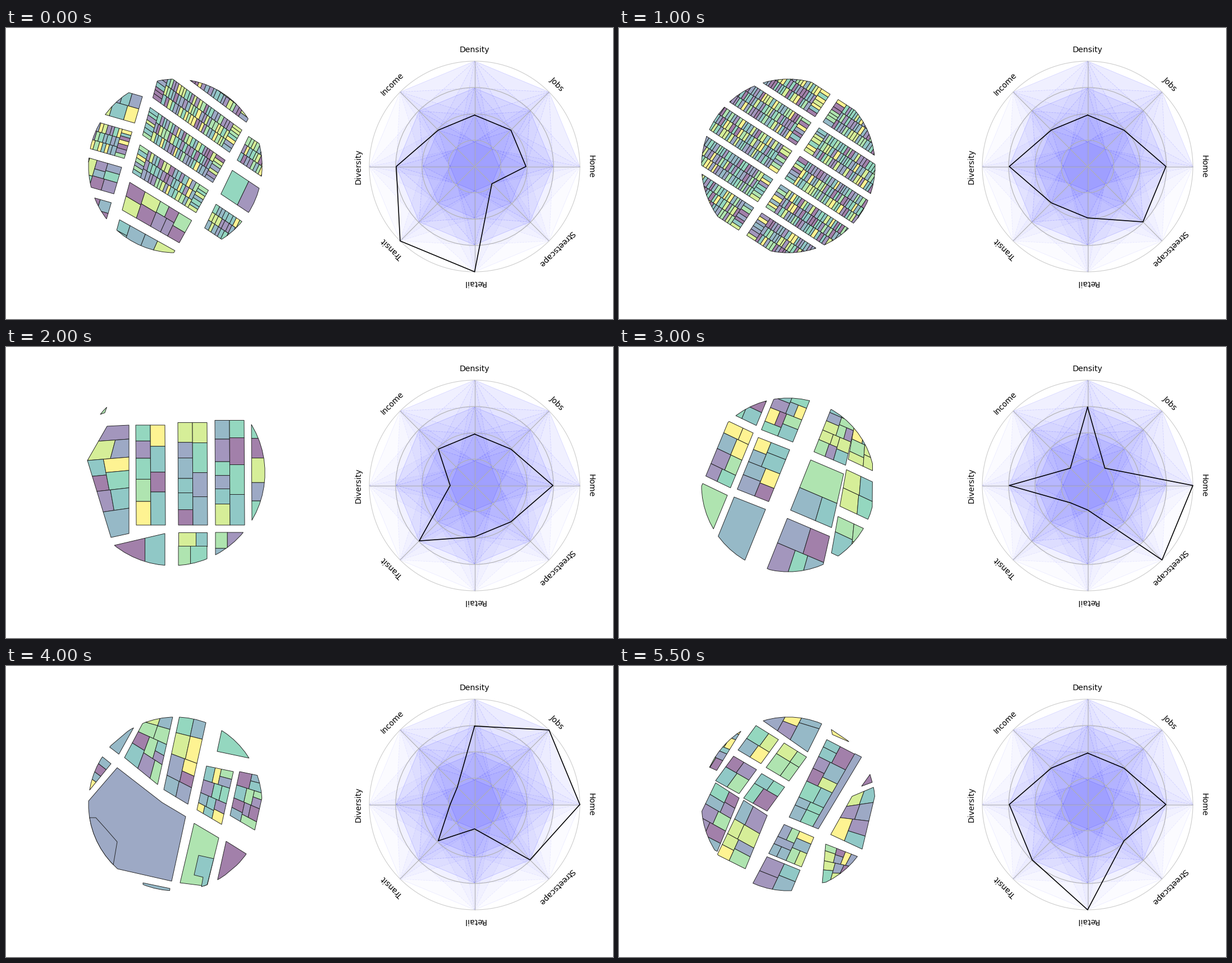
Animation of 1081 by 518 pixels, one loop 6000 ms. Source, as a matplotlib script:

```python
import random
from itertools import product

import numpy as np
import matplotlib.pyplot as plt
from matplotlib.animation import FuncAnimation
from matplotlib.collections import PolyCollection

W, H, DPI = 1081, 518, 100
PX = 72 / DPI
# Viridis at half strength on white.
SHADES = (plt.get_cmap("viridis")(np.linspace(0, 1, 9))[:, :3] + 1) / 2
NORMALS = [np.array((np.cos(a), np.sin(a))) for a in np.arange(64) * np.pi / 32]


def cut(quad, u0, u1, v0, v1):
    """Part of a quad (corners clockwise from top left) in its own u, v space."""
    a, b, c, d = quad

    def at(u, v):
        return (1 - v) * ((1 - u) * a + u * b) + v * ((1 - u) * d + u * c)

    return np.array((at(u0, v0), at(u1, v0), at(u1, v1), at(u0, v1)))


def spans(quad):
    a, b, c, d = quad
    return np.hypot(*(b + c - a - d)) / 2, np.hypot(*(c + d - a - b)) / 2


class Plan:
    """Collects coloured parcels, each cut to a round window."""

    def __init__(self, seed, centre=(301.5, 245.5), radius=154.5):
        self.rng = random.Random(seed)
        self.centre, self.radius = np.array(centre), radius
        self.shapes, self.shades = [], []

    def clip(self, poly):
        for n in NORMALS:
            d = (poly - self.centre) @ n - self.radius
            if d.max() <= 0:
                continue
            out = []
            for i in range(len(poly)):
                if (d[i - 1] > 0) != (d[i] > 0):
                    t = d[i - 1] / (d[i - 1] - d[i])
                    out.append(poly[i - 1] + t * (poly[i] - poly[i - 1]))
                if d[i] <= 0:
                    out.append(poly[i])
            if len(out) < 3:
                return None
            poly = np.array(out)
        return poly

    def lot(self, points, shade=None):
        poly = self.clip(np.reshape(points, (-1, 2)).astype(float))
        if poly is not None:
            self.shapes.append(poly)
            self.shades.append(SHADES[self.rng.randrange(9) if shade is None else shade])

    def row(self, quad, count, jitter=0.25):
        """Side by side lots of slightly uneven width."""
        widths = [1 + self.rng.uniform(-jitter, jitter) for _ in range(count)]
        edges = np.cumsum([0, *widths]) / sum(widths)
        for u0, u1 in zip(edges, edges[1:]):
            self.lot(cut(quad, u0, u1, 0, 1))

    def terrace(self, quad, size, depth=18):
        """Back-to-back rows of narrow lots, closed by a stack at each end."""
        long, high = spans(quad)
        end = depth / long if long > 80 else 0
        if end:
            for u in (0, 1 - end):
                self.row(np.roll(cut(quad, u, u + end, 0, 1), -1, axis=0), round(high / 7))
        rows = max(1, round(high / depth))
        for k in range(rows):
            self.row(cut(quad, end, 1 - end, k / rows, (k + 1) / rows),
                     max(1, round((1 - 2 * end) * long / size)))

    def parcels(self, quad, size):
        """Halves the longer side until the lots are near the wanted size."""
        long, high = spans(quad)
        if max(long, high) < 1.5 * size or long * high < 1.3 * size ** 2:
            return self.lot(quad)
        at = self.rng.uniform(0.38, 0.62)
        for lo, hi in ((0, at), (at, 1)):
            self.parcels(cut(quad, lo, hi, 0, 1) if long > high else cut(quad, 0, 1, lo, hi), size)

    def block(self, corners, size):
        quad = np.reshape(corners, (4, 2)).astype(float)
        (self.terrace if size < 12 else self.parcels)(quad, size)

    def column(self, corners, fill, sizes):
        """One block per lot size, stacked down a quad with streets between."""
        quad, rows = np.reshape(corners, (4, 2)).astype(float), len(sizes)
        for k, size in enumerate(sizes):
            self.block(cut(quad, 0, 1, k / rows, (k + fill) / rows), size)

    def town(self, corner, tilt, step, size, fill=0.79, street=17, rows=5):
        """Parallel blocks on both sides of one cross street."""
        along = np.array((np.cos(np.radians(tilt)), np.sin(np.radians(tilt))))
        corner, drop = np.array(corner), rows * np.array(step)
        for near, far in ((-170, 0), (street, street + 170)):
            a, b = corner + near * along, corner + far * along
            self.column((a, b, b + drop, a + drop), fill, [size] * rows)


def slanted(p):
    p.column((135, 91, 243, 122, 169, 374, 61, 343), 0.75, (18, 7, 18, 15))
    p.column((293, 8, 450, 128, 271, 450, 184, 408), 0.74, (7, 6, 6, 7, 22, 24))
    p.column((432, 193, 492, 233, 405, 414, 345, 374), 0.7, (6, 40, 7))


def terraces(p):
    p.town((370, 113), 30, (-31.2, 52.3), 5.5)


def lanes(p):
    p.town((376, 118), 33, (-34, 50.5), 5.5)


def rows_of_houses(p):
    p.town((382, 123), 37, (-36.5, 49), 6)


def columns(p):
    p.lot((165, 121, 182, 100, 176, 117), 6)
    p.block((180, 141, 219, 139, 219, 196, 145, 202), 32)
    p.block((145, 202, 219, 196, 219, 332, 187, 339), 32)
    p.block((193, 353, 283, 332, 283, 400, 193, 400), 45)
    for x in (231, 306, 372, 437):
        top = 139 - 0.06 * (x - 231)
        for left in (x, x + 26):
            lane = np.array(((left + 26, top), (left + 27, 317), (left + 1, 317), (left, top)))
            p.row(lane, p.rng.choice((4, 5, 6)), 0.3)
        if 300 < x < 400:
            p.block((x + 1, 330, x + 52, 330, x + 52, 392, x + 1, 392), 26)


def avenues(p):
    p.town((372, 96), 23, (-24, 60), 14)


def superblocks(p):
    p.column((241, 21, 285, 42, 147, 375, 103, 354), 0.88, (26, 24, 90))
    p.column((291, 55, 347, 77, 218, 395, 162, 373), 0.87, (20, 24, 90))
    p.column((383, 97, 425, 115, 350, 448, 258, 409), 0.86, (18, 46, 38))
    p.column((420, 135, 452, 150, 450, 420, 375, 385), 0.78, (22, 30, 34))


def quarters(p):
    p.town((352, 82), 21, (-24, 66), 18)


def parkside(p):
    park = (198, 181, 278, 243, 320, 268, 295, 383, 198, 361, 130, 300, 130, 260)
    p.lot(park, 2)
    p.lot((140, 270, 160, 270, 178, 290, 198, 313, 190, 360, 140, 330), 2)
    p.lot((244, 386, 292, 396, 291, 404, 244, 391), 3)
    p.block((184, 144, 230, 105, 201, 157, 192, 150), 26)
    p.block((171, 161, 187, 174, 148, 222, 130, 210), 17)
    p.block((254, 82, 298, 86, 270, 211, 211, 163), 22)
    p.block((310, 85, 358, 92, 324, 246, 281, 220), 27)
    p.lot((384, 115, 440, 120, 433, 164, 376, 152), 5)
    for k in range(2):
        p.block(np.tile((59 * k, 10 * k), 4) + (357, 178, 405, 188, 384, 282, 340, 256), 18)
    p.lot((335, 280, 379, 306, 358, 392, 310, 386), 6)
    p.lot((343, 337, 370, 343, 358, 390, 348, 393, 351, 376, 335, 372), 4)
    p.lot((392, 312, 432, 337, 376, 384), 0)


def boulevards(p):
    p.town((366, 92), 25, (-30, 62), 16)


def crossings(p):
    p.town((360, 104), 28, (-30, 56), 13)


def oldtown(p):
    p.block((219, 113, 174, 186, 150, 175, 195, 105), 14)
    p.block((270, 75, 370, 85, 336, 153, 256, 97), 32)
    for k in range(2):
        shift = np.tile((50 * k, 31 * k), 4)
        p.column(shift + (244, 106, 284, 131, 206, 238, 164, 215), 0.8, (25, 27))
        p.block(shift + (172, 208, 214, 235, 175, 330, 125, 305), 25)
    p.lot((378, 113, 412, 136, 380, 122), 8)
    p.lot((447, 193, 451, 207, 432, 214), 0)
    p.block((370, 131, 420, 157, 345, 286, 303, 269), 22)
    p.lot((420, 156, 432, 162, 355, 290, 345, 286), 2)
    p.column((294, 282, 347, 305, 298, 422, 233, 397), 0.9, (19, 30))
    p.block((415, 232, 460, 213, 433, 326, 377, 300), 28)
    p.block((368, 317, 427, 340, 397, 380, 362, 386), 15)


# Scores run clockwise from Density.
SCENES = [
    (slanted, "22214432"), (terraces, "23331333"), (lanes, "22332232"),
    (rows_of_houses, "21333131"), (columns, "22322312"), (avenues, "44323224"),
    (superblocks, "31441131"), (quarters, "33223322"), (parkside, "34431211"),
    (boulevards, "32232323"), (crossings, "22333232"), (oldtown, "22324332"),
]
LABELS = "Density Jobs Home Streetscape Retail Transit Diversity Income".split()
HUB, RADIUS = np.array((834.5, 246.5)), 187.5

fig = plt.figure(figsize=(W / DPI, H / DPI), dpi=DPI, facecolor="white")
ax = fig.add_axes((0, 0, 1, 1))
ax.set(xlim=(0, W), ylim=(H, 0))
ax.axis("off")


def spoke(axis, r):
    angle = axis * np.pi / 4
    return HUB + r * np.array((np.sin(angle), -np.cos(angle)))


def score_point(axis, score):
    return spoke(axis, 48 * score - 4.5)


# Blue haze: every pair of neighbouring scores adds one faint triangle.
for axis in range(8):
    rim = 0.015 + 0.06 * max(0, np.cos(axis * np.pi / 4))
    level = 0.06
    mixed = 1 - (0.64 / ((1 - rim) * (1 - level) ** 3)) ** (1 / 12)
    for s, t in product(range(1, 5), repeat=2):
        fill = mixed if s != t else rim if s == 4 else level
        ends = np.array((score_point(axis, s), score_point(axis + 1, t)))
        ax.fill(*np.vstack((ends, HUB)).T, color="blue", lw=0, zorder=1, alpha=fill)
        ax.plot(*ends.T, color="blue", lw=0.7 * PX, zorder=1.2,
                alpha=0.2 if max(s, t) < 4 else 0.06 + 1.5 * rim,
                ls="-" if s == t else (0, (5, 2)))

for axis, name in enumerate(LABELS):
    ax.plot(*np.array((HUB, spoke(axis, RADIUS))).T, color="#b0b0b0", lw=1.1 * PX, zorder=1.5)
    ax.text(*spoke(axis, RADIUS + 19.5), name, rotation=-45 * axis, ha="center", va="center",
            family="DejaVu Sans", fontsize=14 * PX)
for share in (0.25, 0.5, 0.75, 1):
    ax.add_patch(plt.Circle(HUB, share * RADIUS, fill=False, zorder=1.5, lw=1.1 * PX,
                            ec="#cccccc" if share == 1 else "#b0b0b0"))

plans = []
for seed, (build, _) in enumerate(SCENES):
    window = {"centre": (296, 224), "radius": 165} if build is columns else {}
    plan = Plan(seed, **window)
    build(plan)
    plans.append(plan)

parcels = PolyCollection([], edgecolors="#1c1c1c", linewidths=0.9 * PX, zorder=2)
ax.add_collection(parcels, autolim=False)
profile, = ax.plot([], [], color="black", lw=1.6 * PX, zorder=3, solid_joinstyle="round")


def update(frame):
    parcels.set_verts(plans[frame].shapes)
    parcels.set_facecolor(plans[frame].shades)
    scores = [int(s) for s in SCENES[frame][1]]
    profile.set_data(*np.array([score_point(i, scores[i % 8]) for i in range(9)]).T)
    return parcels, profile


anim = FuncAnimation(fig, update, frames=len(SCENES), interval=500, repeat=True, repeat_delay=0)
plt.show()
```
